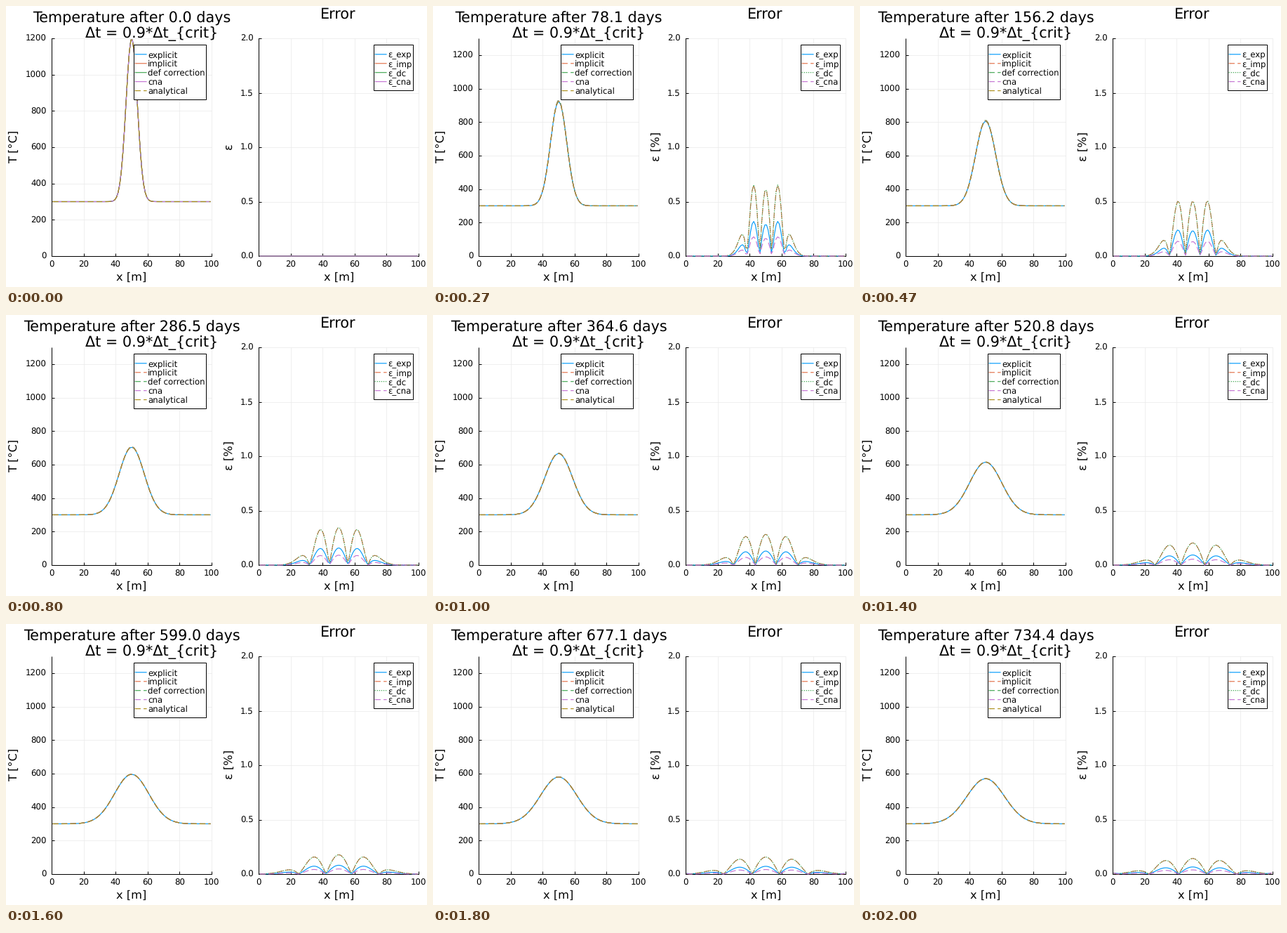
A matplotlib script for the animation above (2070 ms loop, 600 px wide and 400 px high).

```python
import numpy as np
import matplotlib.pyplot as plt
from matplotlib.animation import FuncAnimation
from matplotlib.patches import Rectangle

plt.rcParams.update({
    "font.family": "DejaVu Sans",
    "text.hinting": "none",
    "lines.scale_dashes": False,
    "toolbar": "None",
})

PX = 0.72  # points per pixel at 100 dpi
TICK, LABEL, TITLE = 11.8 * PX, 16.3 * PX, 20.8 * PX
BLUE, ORANGE, GREEN, PURPLE, OCHRE = (
    "#009AFA", "#E36F47", "#3EA44E", "#C371D2", "#AC8E18")
SOLID = "-"
DASH = (0, (6, 3))
DOT = (0, (1, 1.2))
TOP, BOTTOM, WIDTH = 46, 356, 227.6
LEFT_X, RIGHT_X = 65.3, 360.4

# ---- heat diffusion on 100 cells -------------------------------------------
N, T_ROCK, T_PEAK, SIGMA = 100, 300.0, 1200.0, 5.0
R = 0.45                   # kappa * dt / dx^2
DAYS_PER_STEP = 3125 / 600
x = np.arange(N) + 0.5

lap = np.diag(np.full(N, -2.0)) + np.eye(N, k=1) + np.eye(N, k=-1)
lap[0, 0] = lap[-1, -1] = -3.0   # fixed temperature on both ends
one = np.eye(N)
explicit = one + R * lap
implicit = np.linalg.inv(one - R * lap)
crank = np.linalg.inv(one - R / 2 * lap) @ (one + R / 2 * lap)


def analytical(step):
    spread = SIGMA**2 + 4 * R * step
    peak = (T_PEAK - T_ROCK) * SIGMA / np.sqrt(spread)
    return T_ROCK + peak * np.exp(-(x - 50)**2 / spread)


def solve(step):
    """Temperatures of all schemes and their errors in percent."""
    start, exact = analytical(0) - T_ROCK, analytical(step)
    temps = [T_ROCK + np.linalg.matrix_power(m, step) @ start
             for m in (explicit, implicit, implicit, crank)]
    errors = [np.abs(t - exact) / exact * 100 for t in temps]
    return temps + [exact], errors


steps = [0, 1, *range(5, 141, 5), 141]
results = [solve(s) for s in steps]

# ---- stage in pixel coordinates --------------------------------------------
fig = plt.figure(figsize=(6, 4), dpi=100, facecolor="white")
ax = fig.add_axes([0, 0, 1, 1])
ax.set(xlim=(0, 600), ylim=(400, 0))
ax.axis("off")


def write(px, py, s, size, ha="center", **kw):
    return ax.text(px, py, s, size=size, ha=ha, va="baseline", zorder=6, **kw)


def line(xs=(), ys=(), color="black", width=1.0, **kw):
    return ax.plot(xs, ys, color=color, lw=width * PX,
                   solid_capstyle="butt", dash_capstyle="butt", **kw)[0]


def series(color, zorder, xs=(), ys=()):
    return line(xs, ys, color, 1.15, zorder=zorder, snap=False)


def segments(parts):
    """Join (x0, y0, x1, y1) pieces into one broken line."""
    xs, ys = [], []
    for x0, y0, x1, y1 in parts:
        xs += [x0, x1, np.nan]
        ys += [y0, y1, np.nan]
    return xs, ys


class Panel:
    def __init__(self, left, ticks, labels, names, colors, styles, box):
        self.left, self.ticks, self.styles = left, ticks, styles
        self.grid = line(width=0.8, alpha=0.08, zorder=1)
        self.marks = line(zorder=2)
        self.curves = [series(c, 3) for c in colors]
        self.ylabels = [write(left - 7.8, 0, s, TICK, ha="right")
                        for s in labels]
        for v in range(0, 101, 20):
            write(self.px(v), 371.5, str(v), TICK)
        write(self.px(50), 391.2, "x [m]", LABEL)
        self.legend(names, colors, *box)

    def legend(self, names, colors, x0, x1):
        height = 13 * (len(names) + 1) - 0.3
        ax.add_patch(Rectangle((x0, 55.4), x1 - x0, height, fc="white",
                               ec="black", lw=PX, zorder=4))
        self.samples = []
        for i, (name, color) in enumerate(zip(names, colors)):
            y = 68.8 + 12.95 * i
            self.samples.append(
                series(color, 5, [x0 + 2, x0 + 19], [y, y]))
            write(x0 + 20.3, y + 4.2, name, TICK, ha="left")

    def px(self, v):
        return self.left + WIDTH * v / 100

    def scale(self, top):
        self.py = lambda v: BOTTOM - (BOTTOM - TOP) * v / top
        l, r = self.left, self.left + WIDTH
        cols = [self.px(v) for v in range(0, 101, 20)]
        rows = [self.py(v) for v in self.ticks]
        self.grid.set_data(*segments(
            [(c, TOP, c, BOTTOM) for c in cols]
            + [(l, y, r, y) for y in rows]))
        self.marks.set_data(*segments(
            [(l, BOTTOM, r, BOTTOM), (l, TOP, l, BOTTOM)]
            + [(c, BOTTOM, c, BOTTOM - 4) for c in cols]
            + [(l, y, l + 4, y) for y in rows]))
        for text, y in zip(self.ylabels, rows):
            text.set_y(y + 4.3)

    def show(self, data, styles):
        for curve, sample, ys, style in zip(self.curves, self.samples,
                                            data, styles):
            curve.set_data(self.px(x), self.py(ys))
            curve.set_linestyle(style)
            sample.set_linestyle(style)


temp_ticks = range(0, 1201, 200)
temp = Panel(LEFT_X, temp_ticks, [str(v) for v in temp_ticks],
             ["explicit", "implicit", "def correction", "cna", "analytical"],
             [BLUE, ORANGE, GREEN, PURPLE, OCHRE],
             [SOLID, DASH, DASH, DASH, DASH], (181.6, 284.9))
err_ticks = np.arange(0, 2.1, 0.5)
err = Panel(RIGHT_X, err_ticks, [f"{v:.1f}" for v in err_ticks],
            ["ε_exp", "ε_imp", "ε_dc", "ε_cna"],
            [BLUE, ORANGE, GREEN, PURPLE],
            [SOLID, DASH, DOT, DASH], (523.6, 579.6))
err.scale(2)

title = write(179, 23.5, "", TITLE)
write(207.2, 45.4, "Δt = 0.9*Δt_{crit}", TITLE)
write(473.2, 18, "Error", TITLE)
upright = dict(rotation=90, rotation_mode="anchor")
write(15.5, 200, "T [°C]", LABEL, **upright)
err_label = write(322.8, 200, "", LABEL, **upright)


def update(tick):
    k = (3 * tick + 1) // 20   # a new picture every 66.7 ms, on a 10 ms grid
    first = k == 0
    temps, errors = results[k]
    temp.scale(1200 if first else 1300)
    temp.show(temps, [SOLID] * 4 + [DASH] if first else temp.styles)
    err.show(errors, [SOLID] * 4 if first else err.styles)
    err_label.set_text("ε" if first else "ε [%]")
    title.set_text(f"Temperature after {steps[k] * DAYS_PER_STEP:.1f} days")
    return []


anim = FuncAnimation(fig, update, frames=207, interval=10, repeat=True,
                     repeat_delay=0, cache_frame_data=False)
plt.show()
```
